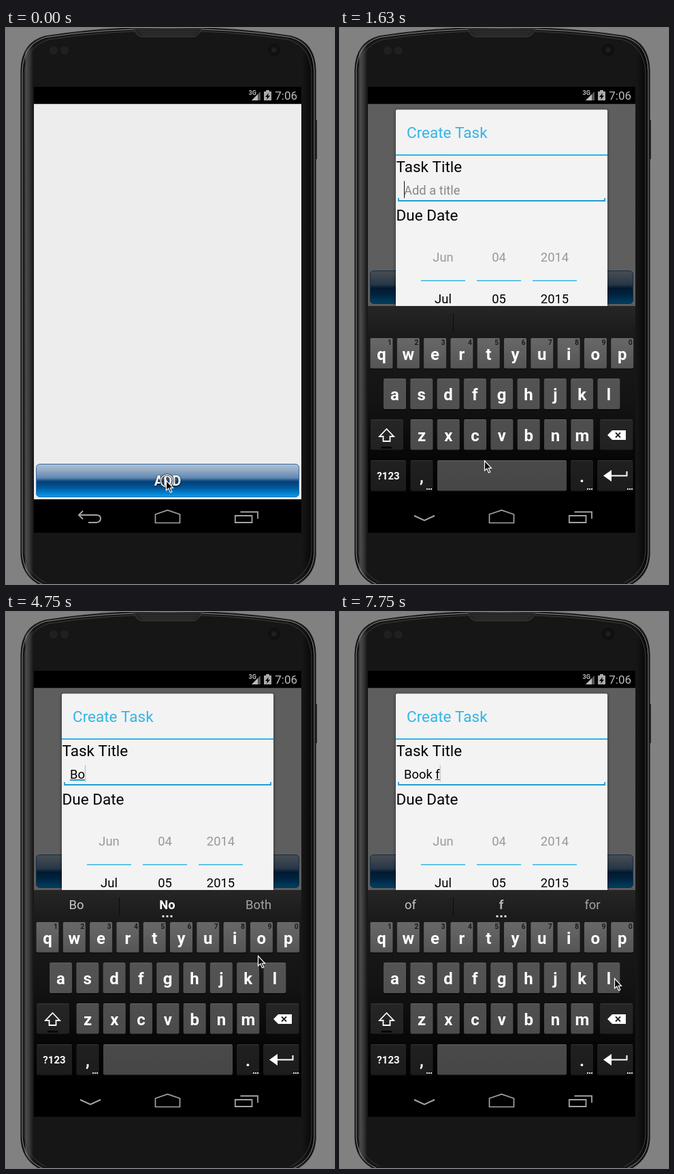
An HTML page with a canvas that plays this animation: 482x814 px, repeating every 8 s.

```html
<!DOCTYPE html>
<html lang="en">
<head>
<meta charset="utf-8">
<title>Create Task</title>
<style>
html, body { margin: 0; width: 100%; height: 100%; overflow: hidden; background: #818181; }
canvas { display: block; }
</style>
</head>
<body>
<canvas id="stage" width="482" height="814"></canvas>
<script>
const W = 482, H = 814, LOOP = 8000, TICK = 149;
const BLUE = '#33b5e5';
const stage = document.getElementById('stage').getContext('2d');
const boardLayer = document.createElement('canvas');
boardLayer.width = W;
boardLayer.height = H;
const board = boardLayer.getContext('2d');
let c = stage;

// Timeline, counted in ticks
const pointer = [
  [0, 235, 663], [8, 235, 663], [10, 226, 645], [11, 212, 634], [14, 66, 599], [16, 66, 599],
  [18, 297, 580], [19, 281, 594], [22, 281, 594], [26, 376, 479], [29, 376, 479], [32, 370, 504],
  [34, 375, 484], [36, 375, 484], [38, 354, 540], [39, 354, 540], [41, 281, 617], [43, 238, 648],
  [45, 238, 651], [48, 199, 538], [49, 199, 538], [51, 335, 538], [52, 403, 537]
];
const presses = [
  [14, 16, 'shift'], [20, 22, 'b'], [27, 28, 'o'], [35, 36, 'o'],
  [38, 39, 'k'], [44, 45, 'space'], [48, 49, 'f']
];
// tick, text, start of the caret blink, start of the underlined part
const typed = [
  [0, '', 3.36, 0], [22, 'B', 22, 0], [28, 'Bo', 28, 0], [36, 'Boo', 36, 0],
  [39, 'Book', 39, 0], [45, 'Book ', 45, 5], [49, 'Book f', 46.5, 5]
];
const hints = [
  [0], [23, 'Bo', 'B', 'By'], [30, 'Bo', 'No', 'Both'], [37, 'Book', 'Boo', 'Boot'],
  [40, 'Books', 'Book', 'Boom'], [46, 'of', 'for', 'and'], [51, 'of', 'f', 'for']
];

const latest = (list, k) => list.filter(e => e[0] <= k).pop();

function pointerAt(k) {
  const i = pointer.findIndex(p => p[0] >= k);
  if (i <= 0) return pointer[0].slice(1);
  const [t0, x0, y0] = pointer[i - 1], [t1, x1, y1] = pointer[i];
  const u = (k - t0) / (t1 - t0);
  return [x0 + (x1 - x0) * u, y0 + (y1 - y0) * u];
}

function rect(x, y, w, h, fill) {
  c.fillStyle = fill;
  c.fillRect(x, y, w, h);
}

function round(x, y, w, h, r, fill, stroke) {
  c.beginPath();
  c.roundRect(x, y, w, h, r);
  c.fillStyle = fill;
  c.fill();
  if (stroke) { c.strokeStyle = stroke; c.lineWidth = 1; c.stroke(); }
}

function line(d, stroke, width = 1, fill) {
  const p = new Path2D(d);
  if (fill) { c.fillStyle = fill; c.fill(p); }
  if (stroke) { c.strokeStyle = stroke; c.lineWidth = width; c.stroke(p); }
}

function disc(x, y, r, fill) {
  c.beginPath();
  c.arc(x, y, r, 0, 7);
  c.fillStyle = fill;
  c.fill();
}

function text(s, x, y, size, fill, align = 'left', weight = 400) {
  c.font = `${weight} ${size}px Roboto, sans-serif`;
  c.textAlign = align;
  c.fillStyle = fill;
  c.fillText(s, x, y);
}

function gradient(x0, y0, x1, y1, stops) {
  const g = c.createLinearGradient(x0, y0, x1, y1);
  stops.forEach(([at, color]) => g.addColorStop(at, color));
  return g;
}

function glossy(x, y, w, h, label) {
  const fill = gradient(0, y, 0, y + h, [
    [0, '#b5c3d3'], [.2, '#93a9c4'], [.42, '#5f88b3'], [.53, '#053f76'], [.72, '#00599d'], [1, '#04a0f4']
  ]);
  round(x + .5, y + .5, w - 1, h - 1, 5, fill, '#2f6cab');
  c.shadowColor = '#000';
  c.shadowBlur = 3;
  c.shadowOffsetY = 1;
  text(label, x + w / 2, y + h / 2 + 7.5, 20, '#fff', 'center', 700);
  c.shadowColor = 'transparent';
  c.shadowBlur = c.shadowOffsetY = 0;
}

function phone() {
  rect(0, 0, W, H, '#818181');
  rect(454, 135, 3, 57, '#222');
  const shell = 'M22 770V62Q23 21 58 12Q140 -1 238 -1T419 12Q454 21 455 62V770Q454 802 425 816H52Q23 802 22 770Z';
  const rim = gradient(22, 0, 455, 0, [
    [0, '#181818'], [.012, '#0c0c0c'], [.016, '#4e4e4e'], [.028, '#3a3a3a'], [.042, '#161616'],
    [.955, '#161616'], [.975, '#0d0d0d'], [1, '#080808']
  ]);
  line(shell, '#1c1c1c', 1.5, rim);
  line('M24 768V63Q25 23 59 13.5Q141 1 238 1T418 13.5Q452 23 453 63V768Q452 801 423 814M53 814Q25 801 24 768', '#8c8c8c', 1);
  line('M27 765V66Q29 28 62 17Q144 4 238 4T415 17Q448 28 449 66V765Q448 796 418 812M58 812Q28 796 27 765', '#3c3c3c', 1);
  line('M188 1Q192 13 200 13H274Q283 13 287 1Z', '#3d3d3d', 1, '#242424');
  line('M196 5H280M198 8H278M200 11H275', '#333', 1);
  [70, 86].forEach(x => disc(x, 33, 6, '#202020'));
  disc(394, 32, 9, '#101010');
  disc(394, 32, 4, '#1d1d22');
}

function systemBars(keyboardUp) {
  rect(41, 86, 393, 25, '#000');
  text('3G', 356.5, 98, 9, '#bbb', 'left', 700);
  line('M361 106L374 93V106Z', null, 1, '#555');
  line('M361 106L370 97V106Z', null, 1, '#bbb');
  line('M382 91H387V93H390V106H379V93H382Z', null, 1, '#aaa');
  line('M386 95L381 101H384L383 105L388 99H385Z', null, 1, '#000');
  text('7:06', 428, 105, 17, '#bcbcbc', 'right');
  rect(41, 690, 393, 49, '#000');
  const ink = '#a4a4a4';
  line(keyboardUp ? 'M109 714L124 721L139 714'
    : 'M113 707L107 713L113 719M107 713H133Q139 713 139 718T133 724H121', ink, 2);
  line('M219.5 724.5V712L237.5 706L255.5 712V724.5Z', ink, 1.7);
  line('M336.8 714H361.5V724H336.8ZM344.5 708.5H370V718.5', ink, 1.8);
}

function dateColumn(x, before, now, after) {
  text(before, x, 341.5, 18.4, '#999', 'center');
  text(now, x, 403, 18.4, '#000', 'center');
  text(after, x, 463, 18.4, '#999', 'center');
  rect(x - 32.5, 369, 65, 1.7, '#4abbe6');
  rect(x - 32.5, 420, 65, 1.7, '#4abbe6');
}

function titleField(k) {
  const [, value, blink, mark] = latest(typed, k);
  text(value || 'Add a title', 94, 244, 18.4, value ? '#000' : '#888');
  const width = s => c.measureText(s).width;
  const end = 94 + (value ? width(value) : 0);
  if (value.length > mark) {
    const start = 94 + width(value.slice(0, mark));
    const corrected = value === 'Bo';
    rect(start, 245, end - start, corrected ? 2 : 1, corrected ? '#249dce' : '#222');
  }
  const shown = (k - blink) * TICK % 1000 < 500;
  c.globalAlpha *= shown ? 1 : value ? .25 : 0;
  rect(end, 224, 1, 25, '#111');
}

function dialog(k, alpha, drop) {
  c.save();
  c.globalAlpha = alpha;
  c.translate(0, drop);
  c.shadowColor = 'rgba(0,0,0,.55)';
  c.shadowBlur = 5;
  c.shadowOffsetY = 1;
  round(82, 119.5, 311, 497, 2, '#f3f3f3');
  c.shadowColor = 'transparent';
  c.shadowBlur = c.shadowOffsetY = 0;
  text('Create Task', 98, 161, 22.5, BLUE);
  rect(82, 185, 311, 2, BLUE);
  text('Task Title', 82.5, 211, 22.5, '#000');
  line('M86 249V253H389V249', '#1c9fce', 1.8);
  text('Due Date', 82.5, 281.5, 22.5, '#000');
  dateColumn(151.5, 'Jun', 'Jul', 'Aug');
  dateColumn(233.5, '04', '05', '06');
  dateColumn(315.5, '2014', '2015', '2016');
  text('Priority', 82.5, 527, 22.5, '#000');
  text('Low', 95, 558, 16.4, '#000');
  glossy(191, 574, 93, 40, 'SAVE');
  titleField(k);
  c.restore();
}

function key(x, y, w, label, { dark, size = 24, down } = {}) {
  const face = down ? '#7e7e7e' : gradient(0, 454, 0, 678, dark
    ? [[0, '#303030'], [1, '#1c1c1c']]
    : [[0, '#686868'], [.2, '#555'], [1, '#464646']]);
  round(x, y + 1, w, 45, 2, '#080808');
  round(x, y, w, 44.5, 2, face);
  rect(x + 1, y, w - 2, 1, dark ? '#3a3a3a' : '#696969');
  if (label) text(label, x + w / 2, y + (size < 20 ? 28 : 31.5), size, '#fff', 'center', 700);
}

function dots(x, y, step = 3, size = 2) {
  for (let i = -1; i < 2; i++) rect(x + i * step - size / 2, y, size, size, '#ddd');
}

function keyboard(k) {
  c = board;
  c.clearRect(0, 0, W, H);
  rect(41, 407, 393, 283, gradient(0, 407, 0, 690, [[0, '#262626'], [.14, '#1b1b1b'], [.5, '#131313'], [.75, '#080808'], [1, '#000']]));
  rect(166, 418, 1, 26, '#0c0c0c');
  const [, left, middle, right] = latest(hints, k);
  if (middle) {
    text(left, 103.5, 435, 18.4, '#c8c8c8', 'center');
    text(middle, 237, 435, 18.4, middle === 'No' ? '#fff' : '#b4b4b4', 'center', 700);
    text(right, 371, 435, 18.4, '#a4a4a4', 'center');
    dots(237, 444, 6, 3);
  }

  const active = presses.find(([a, b]) => k >= a && k < b);
  const pressed = active && active[2];
  const upper = k >= 16 && k < 22;
  const rows = [['qwertyuiop', 61, 454], ['asdfghjkl', 80.5, 513.5], ['zxcvbnm', 120, 573]];
  let popup;
  rows.forEach(([letters, x0, y], row) => [...letters].forEach((ch, i) => {
    const x = x0 + i * 39.3, label = upper ? ch.toUpperCase() : ch, down = pressed === ch;
    key(x - 16.5, y, 33, label, { down });
    if (row === 0) text((i + 1) % 10, x + 12, y + 10, 10.5, '#1c1c1c', 'center', 700);
    if (down) popup = [x, y, label];
  }));

  key(45, 573, 48, '', { dark: true, down: pressed === 'shift' });
  line('M68.5 587L79 598H73.5V605H63.5V598H58Z', '#fff', 1.8, upper ? '#fff' : null);
  rect(61, 613, 15, 2.5, '#000');
  key(382, 573, 48.5, '', { dark: true });
  line('M393 596L400 589H420V603H400Z', null, 1, '#fff');
  line('M405 592.5L412 599.5M412 592.5L405 599.5', '#222', 1.8);
  key(45, 633, 52, '?123', { dark: true, size: 15 });
  key(103.5, 633, 33, ',', { dark: true });
  key(143, 633, 190, '', { down: pressed === 'space' });
  key(339, 633, 33, '.', { dark: true });
  key(378, 633, 52.5, '', { dark: true });
  line('M397 655.5H421.5V649', '#fff', 2);
  line('M387 655.5L399 647V664Z', null, 1, '#fff');
  [131, 367, 426].forEach(x => dots(x, 674));

  if (popup) {
    const [x, y, label] = popup;
    round(x - 18, y - 51, 36, 50, 3, '#4a4a4a', '#222');
    text(label, x, y - 17, 28, '#fff', 'center', 700);
  }
  c = stage;
}

function arrow(k) {
  const [x, y] = pointerAt(k);
  if (k === 0 || presses.some(([a, b]) => k >= a && k < b)) {
    for (const [r, w, color] of [[9, 3, '#222'], [9, 1.5, '#eee']]) {
      c.beginPath();
      c.arc(x + 1.5, y, r, 0, 7);
      c.strokeStyle = color;
      c.lineWidth = w;
      c.stroke();
    }
  }
  c.save();
  c.translate(Math.round(x) + .5, Math.round(y) + .5);
  line('M0 -1V13.5L3.3 10.5L6 16.5L8.3 15.5L5.7 9.8H10Z', '#fff', 1.2, '#0a0a0a');
  c.restore();
}

function draw(k) {
  phone();
  const settled = k > 5;
  c.save();
  c.beginPath();
  c.rect(41, 111, 393, 579);
  c.clip();
  rect(41, 111, 393, 579, '#ededed');
  rect(41, 111, 393, 1, '#bbb');
  glossy(44, settled ? 355 : 638, 387, 49, 'ADD');
  if (k > 2) {
    const dim = settled ? .6 : .14 - (5 - k) * .04;
    rect(41, 111, 393, 579, `rgba(0,0,0,${dim})`);
    if (k === 5) round(44, 378, 387, 24, 4, 'rgba(120,150,200,.15)');
    dialog(k, k === 3 ? .5 : 1, settled ? 0 : k === 5 ? 8.7 : 32);
  }
  if (k > 4) {
    keyboard(k);
    c.globalAlpha = settled ? 1 : .68;
    c.drawImage(boardLayer, 0, settled ? 0 : 18);
  }
  c.restore();
  systemBars(k > 4);
  arrow(k);
}

let shownTick = -1;
const began = performance.now();
function frame() {
  const t = (performance.now() - began) % LOOP;
  const k = Math.min(52, Math.floor((t + 22) / TICK));
  if (k !== shownTick) draw(shownTick = k);
  requestAnimationFrame(frame);
}
frame();
</script>
</body>
</html>
```
